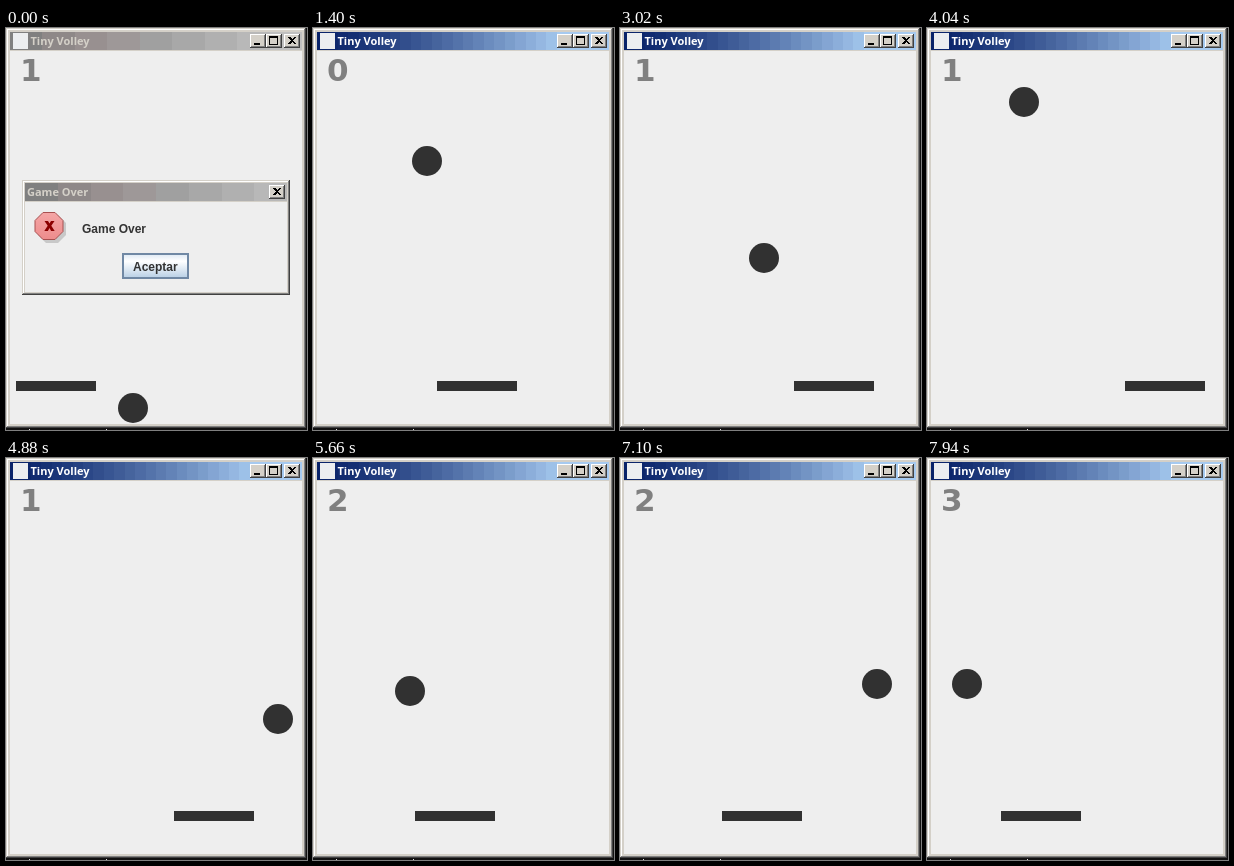
Write an HTML page that moves like this. It is 301 px wide and 402 px high and loops after 8000 ms.

```html
<!DOCTYPE html>
<html lang="en">
<head>
<meta charset="utf-8">
<title>Tiny Volley</title>
<style>
html, body { margin: 0; width: 100%; height: 100%; overflow: hidden; background: #111; }
svg { display: block; width: 100vw; height: 100vh; }
.cap { font: bold 11px "Noto Sans", "Open Sans", sans-serif; }
.label { font: bold 12px "Liberation Sans", Arial, sans-serif; fill: #333; }
#score { font: bold 31px "DejaVu Sans", Verdana, sans-serif; fill: #808080; }
</style>
</head>
<body>
<svg id="stage" viewBox="0 0 301 402" xmlns="http://www.w3.org/2000/svg">
  <defs>
    <linearGradient id="btn" x1="0" y1="0" x2="0" y2="1">
      <stop offset="0" stop-color="#dde8f3"/>
      <stop offset=".3" stop-color="#fff"/>
      <stop offset="1" stop-color="#b8cfe5"/>
    </linearGradient>
    <linearGradient id="sign" x1="0" y1="0" x2="0" y2="1">
      <stop offset="0" stop-color="#f4a6a6"/>
      <stop offset="1" stop-color="#ee8c8c"/>
    </linearGradient>
  </defs>
  <g id="frame" shape-rendering="crispEdges"></g>
  <g id="active" shape-rendering="crispEdges"></g>
  <g id="inactive" shape-rendering="crispEdges"></g>
  <g id="controls" shape-rendering="crispEdges"></g>
  <text id="title" class="cap" x="24.5" y="17">Tiny Volley</text>
  <circle id="ball" r="15" fill="#313131"/>
  <rect id="racquet" y="353" width="80" height="10" fill="#313131"/>
  <text id="score" x="14" y="53"></text>
  <g id="dialog">
    <g id="box" shape-rendering="crispEdges"></g>
    <text class="cap" x="21" y="168" fill="#d4d0c8">Game Over</text>
    <path d="M40 187h12l8 8v12l-8 8h-12l-8-8v-12z" fill="#b4b4b4" opacity=".65"/>
    <path d="M37 184.5h12l8 8v11l-8 8h-12l-8-8v-11z" fill="url(#sign)" stroke="#a85050"/>
    <path d="M38.5 193h3.5l1.5 2.6 1.5-2.6h3.5l-3.2 4.8 3.4 5.2h-3.6l-1.6-2.9-1.6 2.9h-3.6l3.4-5.2z" fill="#8b0000"/>
    <text class="label" x="76" y="205">Game Over</text>
    <rect x="117" y="226" width="65" height="24" fill="url(#btn)" stroke="#7088a4" stroke-width="2"/>
    <text class="label" x="127" y="243">Aceptar</text>
  </g>
</svg>
<script>
const NS = "http://www.w3.org/2000/svg";
const $ = id => document.getElementById(id);

function add(parent, tag, attrs) {
  const el = document.createElementNS(NS, tag);
  for (const k in attrs) el.setAttribute(k, attrs[k]);
  parent.appendChild(el);
}
const rect = (p, x, y, width, height, fill) => add(p, "rect", { x, y, width, height, fill });

// Raised edge: light on the top and left, dark on the bottom and right.
function bevel(p, x, y, w, h, light, dark, face) {
  rect(p, x, y, w, h, dark);
  rect(p, x, y, w - 1, h - 1, light);
  rect(p, x + 1, y + 1, w - 2, h - 2, face);
}

function panel(p, x, y, w, h) {
  bevel(p, x, y, w, h, "#d4d0c8", "#404040", "#808080");
  bevel(p, x + 1, y + 1, w - 2, h - 2, "#fff", "#808080", "#d4d0c8");
}

const icons = {
  min: "M4 9h6v2h-6z",
  max: "M3 2h9v9h-9zM4 4v6h7v-6z",
  close: "M4 3h2l2 2 2-2h2l-3 3.5 3 3.5h-2l-2-2-2 2h-2l3-3.5z"
};

function control(p, x, y, icon) {
  bevel(p, x, y, 16, 14, "#fff", "#404040", "#808080");
  rect(p, x + 1, y + 1, 13, 11, "#d4d0c8");
  add(p, "path", { d: icons[icon], "fill-rule": "evenodd", transform: `translate(${x} ${y})` });
}

// Title bar gradient in n flat bands.
function bar(p, x, y, w, n, color) {
  for (let i = 0; i < n; i++) {
    const left = Math.round(x + w * i / n);
    rect(p, left, y, x + w - left, 18, `rgb(${color(i)})`);
  }
}

const navy = [10, 36, 106], sky = [166, 202, 240];
function blue(i) {
  const k = Math.min(1, i / 23) ** 1.3;
  return navy.map((c, j) => Math.round(c + (sky[j] - c) * k));
}
function gray(i) {
  const v = 128 + 8 * i, warm = Math.round(8 * Math.max(0, Math.sin(i * Math.PI / 4)));
  return [v + warm, v, v];
}

function build() {
  const f = $("frame");
  rect(f, 0, 0, 301, 402, "#111");
  panel(f, 0, 0, 300, 400);
  rect(f, 4, 23, 292, 373, "#eee");
  rect(f, 23, 401, 1, 1, "#ddd");
  rect(f, 100, 401, 1, 1, "#ddd");

  bar($("active"), 4, 4, 292, 28, blue);
  bar($("inactive"), 4, 4, 292, 9, gray);

  const c = $("controls");
  rect(c, 7, 5, 15, 16, "#eceef0");
  control(c, 244, 6, "min");
  control(c, 260, 6, "max");
  control(c, 278, 6, "close");

  const b = $("box");
  panel(b, 16, 152, 268, 115);
  bar(b, 19, 155, 262, 8, gray);
  rect(b, 19, 174, 262, 90, "#eee");
  control(b, 263, 157, "close");
}

const LOOP = 8000, START = 860, STEP = 60;
const WIDTH = 260, FALL = 301, RISE = 290;

// Distance the ball has covered along each axis: [time, across, down].
const path = [[890, 0, 0], [1400, 95, 95], [3020, 395, 399], [4040, 598, 627],
  [5660, 962, 987], [7100, 1322, 1370], [7940, 1539, 1585]];

// Key presses: [time, distance], all at one racquet speed.
const moves = [[1000, 120], [2060, 50], [3700, 24], [4800, -96], [7300, 21], [7640, -49]];
const SPEED = 0.37;

function travel(t) {
  const i = Math.max(1, path.findIndex(p => p[0] >= t));
  const a = path[i - 1], b = path[i];
  const k = Math.max(0, (t - a[0]) / (b[0] - a[0]));
  return [1, 2].map(j => Math.round(a[j] + (b[j] - a[j]) * k));
}

// Bounce between 0 and down, coming back from up.
function fold(d, down, up) {
  const m = d % (down + up);
  return m < down ? m : down + up - m;
}

function racquetX(t) {
  return Math.round(moves.reduce((x, [from, d]) => {
    const gone = Math.min(Math.abs(d), Math.max(0, t - from) * SPEED);
    return x + Math.sign(d) * gone;
  }, 4));
}

function draw(time) {
  const over = time < START;
  const t = START + STEP * Math.floor((time - START) / STEP);
  const [across, down] = travel(t);
  const set = (id, k, v) => $(id).setAttribute(k, v);
  const show = (id, on) => set(id, "visibility", on ? "visible" : "hidden");
  show("dialog", over);
  show("inactive", over);
  show("active", !over);
  set("title", "fill", over ? "#d4d0c8" : "#fff");
  set("ball", "cx", over ? 127 : 19 + fold(across, WIDTH, WIDTH));
  set("ball", "cy", over ? 380 : 38 + fold(down, FALL, RISE));
  set("racquet", "x", over ? 10 : racquetX(t));
  $("score").textContent = over ? 1 : Math.floor((down + RISE) / (FALL + RISE));
}

build();
draw(0);
const begin = performance.now();
(function tick() {
  draw((performance.now() - begin) % LOOP);
  requestAnimationFrame(tick);
})();
</script>
</body>
</html>
```
